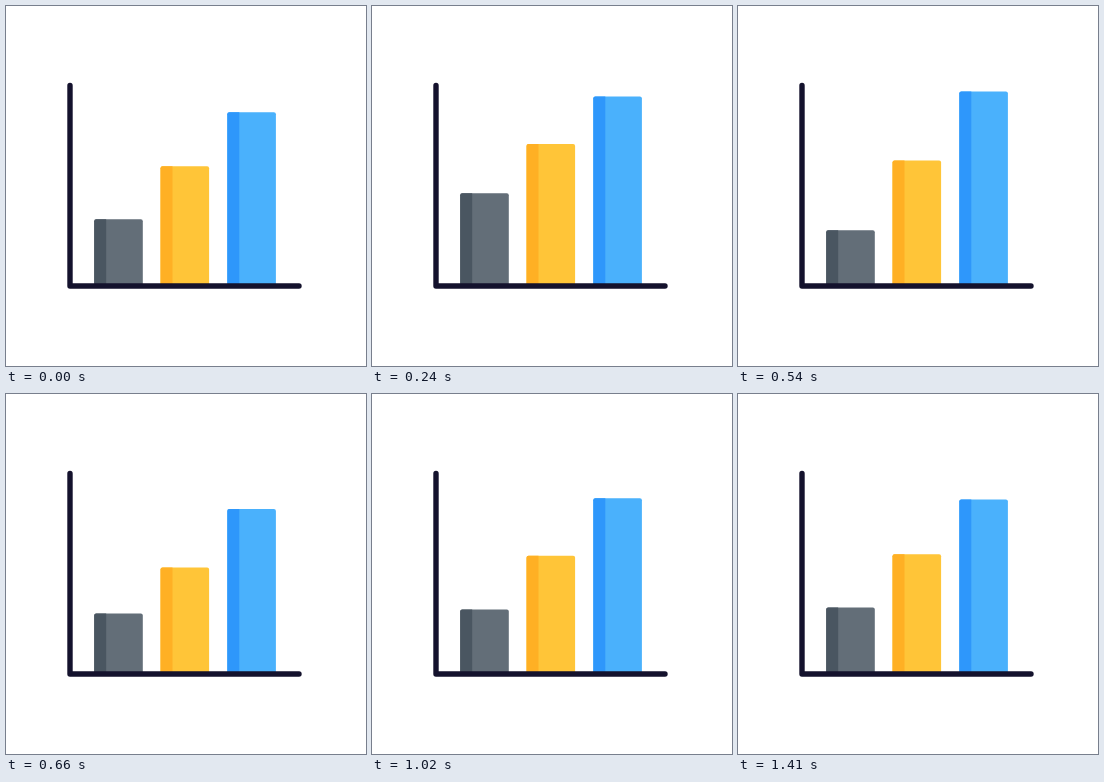
These frames come from a looping animation (360x360 px, 1.44 s). An HTML page:

```html
<!DOCTYPE html>
<html lang="en">
<head>
<meta charset="utf-8">
<title>Bouncing bar chart</title>
<style>
  html, body { margin: 0; width: 100%; height: 100%; overflow: hidden; background: #fff; }
  svg { display: block; width: 100vw; height: 100vh; }
</style>
</head>
<body>
<svg viewBox="0 0 360 360">
  <g id="bars"></g>
  <path d="M64 79.5V280H293" fill="none" stroke="#14122d" stroke-width="5.4" stroke-linecap="round" stroke-linejoin="round"/>
</svg>
<script>
const LOOP = 1440, STEP = 30, STAGGER = 67;
const BASE = 279, WIDTH = 48.6, SHADE = 12, RADIUS = 2;
const PEAK_TIME = 300, REST_TIME = 490, RISE = 27;

const bars = [
  { x: 88.2, top: 213.2, face: '#636e78', side: '#4a5661' },
  { x: 154.5, top: 160.2, face: '#ffc538', side: '#ffb024' },
  { x: 221.3, top: 106.3, face: '#4ab1fc', side: '#2e97fb' },
];

function addPath(fill) {
  const path = document.createElementNS('http://www.w3.org/2000/svg', 'path');
  path.setAttribute('fill', fill);
  document.getElementById('bars').append(path);
  return path;
}

for (const bar of bars) {
  bar.facePath = addPath(bar.face);
  bar.sidePath = addPath(bar.side);
}

// Upward stretch, quick drop, then a damped spring around the resting height.
function offset(t) {
  if (t <= 0) return 0;
  if (t < PEAK_TIME) return -RISE * (1 - (1 - t / PEAK_TIME) ** 2);
  if (t < REST_TIME) {
    return -RISE * (1 - ((t - PEAK_TIME) / (REST_TIME - PEAK_TIME)) ** 2.5);
  }
  const s = t - REST_TIME;
  return 20 * Math.exp(-s / 250) * Math.sin(Math.PI * s / 215);
}

function draw(now) {
  const t = Math.floor((now % LOOP) / STEP) * STEP;
  bars.forEach((bar, i) => {
    const y = bar.top + offset(t - i * STAGGER);
    const start = `M${bar.x} ${BASE}V${y + RADIUS}q0 ${-RADIUS} ${RADIUS} ${-RADIUS}`;
    bar.facePath.setAttribute('d',
      `${start}H${bar.x + WIDTH - RADIUS}q${RADIUS} 0 ${RADIUS} ${RADIUS}V${BASE}z`);
    bar.sidePath.setAttribute('d', `${start}H${bar.x + SHADE}V${BASE}z`);
  });
}

function tick() {
  draw(performance.now());
  requestAnimationFrame(tick);
}
tick();
</script>
</body>
</html>
```
